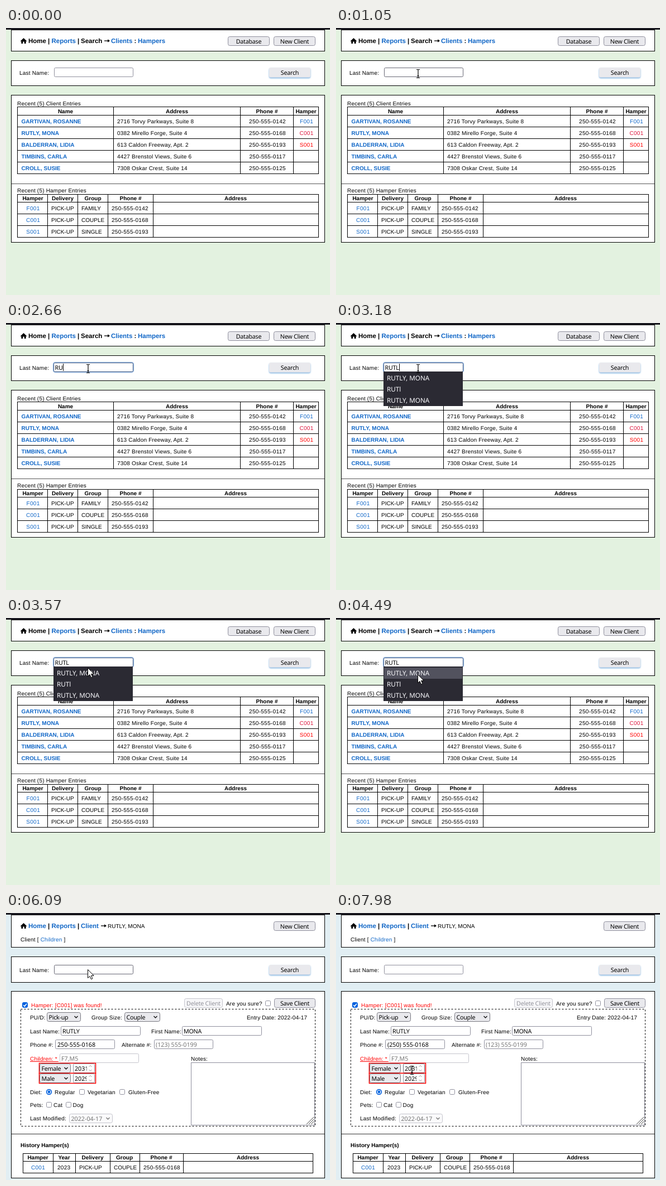
Write an HTML page that moves like this. It is 580 px wide and 479 px high and loops after 8000 ms.

```html
<!DOCTYPE html>
<html lang="en">
<head>
<meta charset="utf-8">
<title>Client search</title>
<style>
html, body { margin: 0; width: 580px; height: 479px; overflow: hidden; }
svg { display: block; }
text { font: 10px "Liberation Sans", Arial, sans-serif; letter-spacing: .2px; text-rendering: geometricPrecision; white-space: pre; }
.b { font-weight: bold; letter-spacing: 0; }
.c { letter-spacing: 0; }
.p { letter-spacing: .3px; }
.h { font-size: 11.5px; font-weight: bold; letter-spacing: 0; }
.u { font: 10.7px "Noto Sans", "Open Sans", sans-serif; letter-spacing: -.25px; }
.n { font: 10.7px "Noto Sans", "Open Sans", sans-serif; letter-spacing: 0; }
.w { font: 11.7px "Noto Sans", "Open Sans", sans-serif; letter-spacing: 0; fill: #fbfbfe; }
.l { fill: #1167c7; }
.r { fill: #f00; }
.k { fill: #dc143c; }
.g { fill: #757575; }
.d { fill: #94949c; }
.m { text-anchor: middle; }
</style>
</head>
<body>
<svg id="stage" width="580" height="479" viewBox="0 0 580 479"></svg>
<script>
const GREY = '#8f8f9d', BTN = '#e9e9ed', BLUE = '#0060df', DIM = '#c4c4cc';
const CLIENT = 'RUTLY, MONA', PHONE = '250-555-0168';

// Drawing helpers; boxes take their outermost pixel columns and rows
const txt = (x, y, s, cls = 'a') => `<text x="${x}" y="${y}" class="${cls}">${s}</text>`;
const box = (x1, y1, x2, y2, fill = '#fff', stroke = '#000', rx = 0, extra = '') =>
  `<rect x="${x1 + .5}" y="${y1 + .5}" width="${x2 - x1}" height="${y2 - y1}" rx="${rx}" fill="${fill}" stroke="${stroke}" ${extra}/>`;
const path = (d, stroke = '#000', width = 1, fill = 'none') =>
  `<path d="${d}" stroke="${stroke}" stroke-width="${width}" fill="${fill}"/>`;
const button = (x1, y1, x2, y2, s, off) =>
  box(x1, y1, x2, y2, off ? '#f7f7f9' : BTN, off ? DIM : GREY, 3) +
  txt((x1 + x2 + 1) / 2, y1 + 13, s, off ? 'u m d' : 'u m');
const input = (x1, y1, x2, s = '', cls = 'u', stroke = GREY) =>
  box(x1, y1, x2, y1 + 16, '#fff', stroke, 2) + txt(x1 + 3, y1 + 13, s, cls);
const chevron = (x, y, color) => path(`M${x - 3} ${y - 1.5}l3 3l3-3`, color, 1.4);
const select = (x1, y1, x2, s, off) =>
  box(x1, y1, x2, y1 + 16, off ? '#fafafb' : BTN, off ? DIM : '#77777f', 3) +
  txt(x1 + 3.5, y1 + 13, s, off ? 'n g' : 'u') + chevron(x2 - 7.5, y1 + 8.5, off ? '#777' : '#111');
const check = (x, y, on) => box(x, y, x + 9, y + 9, on ? BLUE : '#fff', on ? BLUE : GREY, 2) +
  (on ? path(`M${x + 2.3} ${y + 5.2}l2 2.2l3.6-4.6`, '#fff', 1.6) : '');

function grid(x1, x2, cols, rows) {
  const top = rows[0], end = rows[rows.length - 1];
  let d = '';
  for (const y of rows.slice(1, -1)) d += `M${x1} ${y + .5}H${x2}`;
  for (const x of cols) d += `M${x + .5} ${top}V${end}`;
  return box(x1, top, x2, end) + path(d);
}

const arrow = x => path(`M${x} 23H${x + 8}`, '#000', 1.3) +
  path(`M${x + 6} 20.3L${x + 10} 23L${x + 6} 25.7Z`, 'none', 0, '#000');
const house = path('M25.8 23.4L31.5 18L37.2 23.4L36.3 24.2L35.6 23.6V28H32.8V24.6H30.2V28H27.4V23.6L26.7 24.2Z', 'none', 0, '#000');
const nav = items => house + items.map(([x, s, cls = '']) => txt(x, 27, s, 'h ' + cls)).join('');

const panel = (y, cls) => txt(24, y + 13, 'Last Name:') +
  box(86, y, 227, y + 16, '#fff', GREY, 2, `class="${cls}"`) +
  `<rect x="471" y="${y}" width="74" height="17.5" rx="3" fill="${BTN}" filter="url(#glow)"/>` +
  txt(508, y + 13, 'Search', 'u m');

const heads = (y, list) => list.map(([x, s]) => txt(x, y, s, 'b m')).join('');

function listPage() {
  const clients = [
    ['GARTIVAN, ROSANNE', '2716 Torvy Parkways, Suite 8', '250-555-0142', 'F001', 'l'],
    [CLIENT, '0382 Mirello Forge, Suite 4', PHONE, 'C001', 'k'],
    ['BALDERRAN, LIDIA', '613 Caldon Freeway, Apt. 2', '250-555-0193', 'S001', 'r'],
    ['TIMBINS, CARLA', '4427 Brenstol Views, Suite 6', '250-555-0117', '', 'l'],
    ['CROLL, SUSIE', '7308 Oskar Crest, Suite 14', '250-555-0125', '', 'l']
  ];
  const groups = ['FAMILY', 'COUPLE', 'SINGLE'];
  return box(0, 0, 579, 478, '#e3f2e0', 'none') + '<rect y="3" width="580" height="476" fill="#e3f2e0"/>' +
    box(9, 3, 570, 41) + box(9, 58, 570, 103) + box(9, 120, 570, 384) +
    path('M10 279.5H570', '#555') +
    nav([[40, 'Home'], [75, '|'], [81.5, 'Reports', 'l'], [128, '|'], [134, 'Search'],
      [188, 'Clients', 'l'], [229.5, ':'], [236, 'Hampers', 'l']]) + arrow(176) +
    button(397, 15, 471, 31, 'Database') + button(479, 15, 553, 31, 'New Client') +
    panel(71, 'field') +
    txt(20, 139, 'Recent (5) Client Entries') +
    grid(20, 559, [192, 419, 514], [141, 156, 177, 198, 219, 240, 261]) +
    heads(153, [[106.5, 'Name'], [306, 'Address'], [467, 'Phone #'], [537, 'Hamper']]) +
    clients.map(([name, street, phone, code, color], i) => {
      const y = 171 + 21 * i;
      return txt(27.5, y, name, 'b l') + txt(199, y, street) + txt(468, y, phone, 'p m') + txt(538, y, code, 'p m ' + color);
    }).join('') +
    txt(20, 295, 'Recent (5) Hamper Entries') +
    grid(20, 559, [74, 128, 182, 263], [298, 312, 333, 354, 375]) +
    heads(309, [[48, 'Hamper'], [101.5, 'Delivery'], [155.5, 'Group'], [223, 'Phone #'], [411, 'Address']]) +
    groups.map((group, i) => {
      const y = 327 + 21 * i, [, , phone, code] = clients[i];
      return txt(48.5, y, code, 'p m l') + txt(81, y, 'PICK-UP', 'c') + txt(135, y, group, 'c') + txt(189, y, phone, 'p');
    }).join('');
}

const child = (y, sex, year, cls) =>
  box(59, y - 1, 160, y + 17, '#fff', '#f00', 0, 'stroke-width="1.5"') + select(60, y, 115, sex) +
  box(120, y, 158, y + 16, '#fff', GREY, 2, `class="${cls}"`) +
  `<g clip-path="url(#year)">${txt(123, y + 12.5, year, 'n')}</g>` +
  path(`M148.5 ${y + 6}l2.5-2.5l2.5 2.5M148.5 ${y + 11}l2.5 2.5l2.5-2.5`, '#999');

function clientPage() {
  const [last, first] = CLIENT.split(', ');
  return '<rect y="3" width="580" height="476" fill="#e1eef3"/>' +
    box(9, 3, 570, 61) + box(9, 78, 570, 124) + box(9, 140, 570, 475) +
    path('M10 396.5H570', '#333') +
    nav([[40, 'Home', 'l'], [75, '|'], [81.5, 'Reports', 'l'], [128, '|'], [134, 'Client', 'l']]) + arrow(170) +
    txt(182, 27, CLIENT, 'c') + button(479, 15, 553, 31, 'New Client') +
    txt(26, 51, 'Client [ <tspan class="l">Children</tspan> ]') +
    panel(93, 'field2') +
    check(29, 160, true) + txt(45, 169, 'Hamper: [C001] was found!', 'r') +
    button(319, 153, 387, 169, 'Delete Client', true) + txt(394, 166, 'Are you sure?') +
    check(464, 157) + button(480, 153, 553, 169, 'Save Client') +
    box(26, 172, 553, 382, 'none', '#000', 0, 'stroke-dasharray="3 3"') +
    txt(43, 191, 'PU/D:') + select(73, 178, 133, 'Pick-up') +
    txt(153, 191, 'Group Size:') + select(212, 178, 275, 'Couple') +
    txt(431, 191, 'Entry Date: 2022-04-17') +
    txt(43, 216, 'Last Name:') + input(98, 203, 240, last) +
    txt(260, 216, 'First Name:') + input(315, 203, 457, first) +
    txt(43, 240, 'Phone #:') + input(88, 227, 194) + '<text id="phone" class="n" x="92" y="240"></text>' +
    txt(207, 240, 'Alternate #:') + input(265, 227, 370, '(123) 555-0199', 'n g') +
    txt(43, 265, 'Children: *', 'r') + path('M43 266.5H94', '#f00') + input(96, 252, 237, 'F7,M5', 'n g', DIM) +
    txt(331, 265, 'Notes:') + box(331, 268, 552, 380, '#fff', GREY) +
    path('M538 379L551 366M542 379L551 370M546 379L551 374', '#444') +
    child(270, 'Female', '2031', 'year') + child(288, 'Male', '2029', '') +
    txt(43, 325, 'Diet:') +
    `<circle cx="77" cy="321" r="4.4" fill="#fff" stroke="${BLUE}" stroke-width="1.6"/><circle cx="77" cy="321" r="2.4" fill="${BLUE}"/>` +
    txt(87, 325, 'Regular') + check(131, 316) + txt(146, 325, 'Vegetarian') +
    check(203, 316) + txt(219, 325, 'Gluten-Free') +
    txt(43, 348, 'Pets:') + check(72, 339) + txt(85, 348, 'Cat') + check(107, 339) + txt(119.5, 348, 'Dog') +
    txt(43, 372, 'Last Modified:') + select(113, 360, 190, '2022-04-17', true) +
    txt(26, 420, 'History Hamper(s)', 'b') +
    grid(30, 549, [84, 124, 186, 239, 317], [431, 445, 466]) +
    heads(442, [[57, 'Hamper'], [104, 'Year'], [155, 'Delivery'], [212, 'Group'], [278, 'Phone #'], [433, 'Address']]) +
    txt(57.5, 460, 'C001', 'p m l') + txt(92, 460, '2023', 'p') + txt(131, 460, 'PICK-UP', 'c') +
    txt(193, 460, 'COUPLE', 'c') + txt(246, 460, PHONE, 'p');
}

const focusRing = '<g id="focus">' + box(84, 70, 228, 88, 'none', '#b5d0f2', 4, 'stroke-width="2"') +
  box(85, 71, 227, 87, '#fff', '#2c4a78', 2) + '</g>';
const menu = '<g id="menu"><rect id="menuBg" x="85" y="87" width="142" fill="#2b2a33"/>' +
  '<rect id="hot" x="86" y="89" width="140" height="20" fill="#52525e"/>' +
  [CLIENT, 'RUTl', CLIENT].map((s, i) => `<g class="row">${txt(91, 103 + 20 * i, s, 'w')}</g>`).join('') + '</g>';

const $ = id => document.getElementById(id);
$('stage').innerHTML =
  '<defs><filter id="glow" x="-10%" y="-40%" width="120%" height="200%"><feDropShadow dx="0" dy="1.5" stdDeviation="1.3" flood-color="#3f8fd0" flood-opacity=".75"/></filter>' +
  '<clipPath id="year"><rect x="121" y="269" width="23.5" height="40"/></clipPath></defs>' +
  `<g id="list">${listPage()}${focusRing}<text id="typed" class="u" x="87.5" y="84"></text>` +
  `<rect id="caret" y="73" width="1" height="13"/>${menu}</g>` +
  `<g id="client">${clientPage()}</g><rect width="580" height="3" fill="#1c1b22"/>` +
  '<g id="arrow">' + path('M.5 .5V15.6L4 12.4L6.4 17.8L8.9 16.7L6.5 11.4H11.2Z', '#000', 1, '#fff') + '</g>' +
  '<g id="beam">' + path('M-3-7.5H-1L0-7L1-7.5H3M0-7V7M-3 7.5H-1L0 7L1 7.5H3M-1.5 3.5H1.5', '#000', 1.2) + '</g>';

// Each step changes part of the state at its time in ms
const steps = [
  [0, { page: 'list', cursor: '', at: [0, 0], text: '', caret: 0, focus: 0, hover: 0, rows: 0, hot: 0, phone: PHONE, year: 0 }],
  [530, { cursor: 'arrow', at: [153, -8] }],
  [660, { at: [151, 12] }],
  [790, { at: [150, 38] }],
  [920, { at: [148, 62] }],
  [1050, { cursor: 'beam', at: [147, 82], hover: 1 }],
  [1320, { focus: 1, caret: 1 }],
  [1460, { rows: 1 }],
  [1880, { caret: 0 }],
  [2140, { text: 'R', caret: 1 }],
  [2270, { rows: 0 }],
  [2530, { text: 'RU' }],
  [2920, { text: 'RUT' }],
  [3050, { text: 'RUTL' }],
  [3180, { rows: 3 }],
  [3440, { cursor: 'arrow', at: [146, 86] }],
  [3570, { at: [146, 89], caret: 0 }],
  [3700, { hot: 1 }],
  [3830, { at: [146, 96] }],
  [3960, { at: [146, 101], caret: 1 }],
  [4490, { caret: 0 }],
  [4890, { rows: 0, hot: 0 }],
  [5020, { text: CLIENT, caret: 1 }],
  [5550, { caret: 0 }],
  [6090, { page: 'client' }],
  [6380, { phone: '(250) ' + PHONE.slice(4) }],
  [7200, { at: [149, 142], hover: 0 }],
  [7330, { at: [156, 222] }],
  [7460, { at: [161, 269] }],
  [7720, { cursor: 'beam', at: [152, 275], year: 1 }],
  [7850, { at: [142, 280] }],
  [7980, { at: [136, 282] }]
];

const show = (el, on) => el.setAttribute('display', on ? 'inline' : 'none');
const border = (cls, on) => document.querySelector('.' + cls).setAttribute('stroke', on ? '#676774' : GREY);
const rowEls = document.querySelectorAll('.row');

function render(t) {
  const s = Object.assign({}, ...steps.filter(step => step[0] <= t).map(step => step[1]));
  for (const id of ['list', 'client']) show($(id), s.page === id);
  for (const id of ['arrow', 'beam']) {
    show($(id), s.cursor === id);
    $(id).setAttribute('transform', `translate(${s.at})`);
  }
  show($('focus'), s.focus);
  border('field', s.hover);
  border('field2', s.hover);
  border('year', s.year);
  $('typed').textContent = s.text;
  $('phone').textContent = s.phone;
  show($('caret'), s.caret);
  if (s.page === 'list') {
    $('caret').setAttribute('x', Math.round(87.7 + (s.text ? $('typed').getComputedTextLength() : 0)));
  }
  show($('menu'), s.rows);
  $('menuBg').setAttribute('height', 2 + 20 * s.rows);
  show($('hot'), s.hot);
  rowEls.forEach((el, i) => show(el, i < s.rows));
}

const start = performance.now();
function tick() {
  render((performance.now() - start) % 8000);
  requestAnimationFrame(tick);
}
tick();
</script>
</body>
</html>
```
